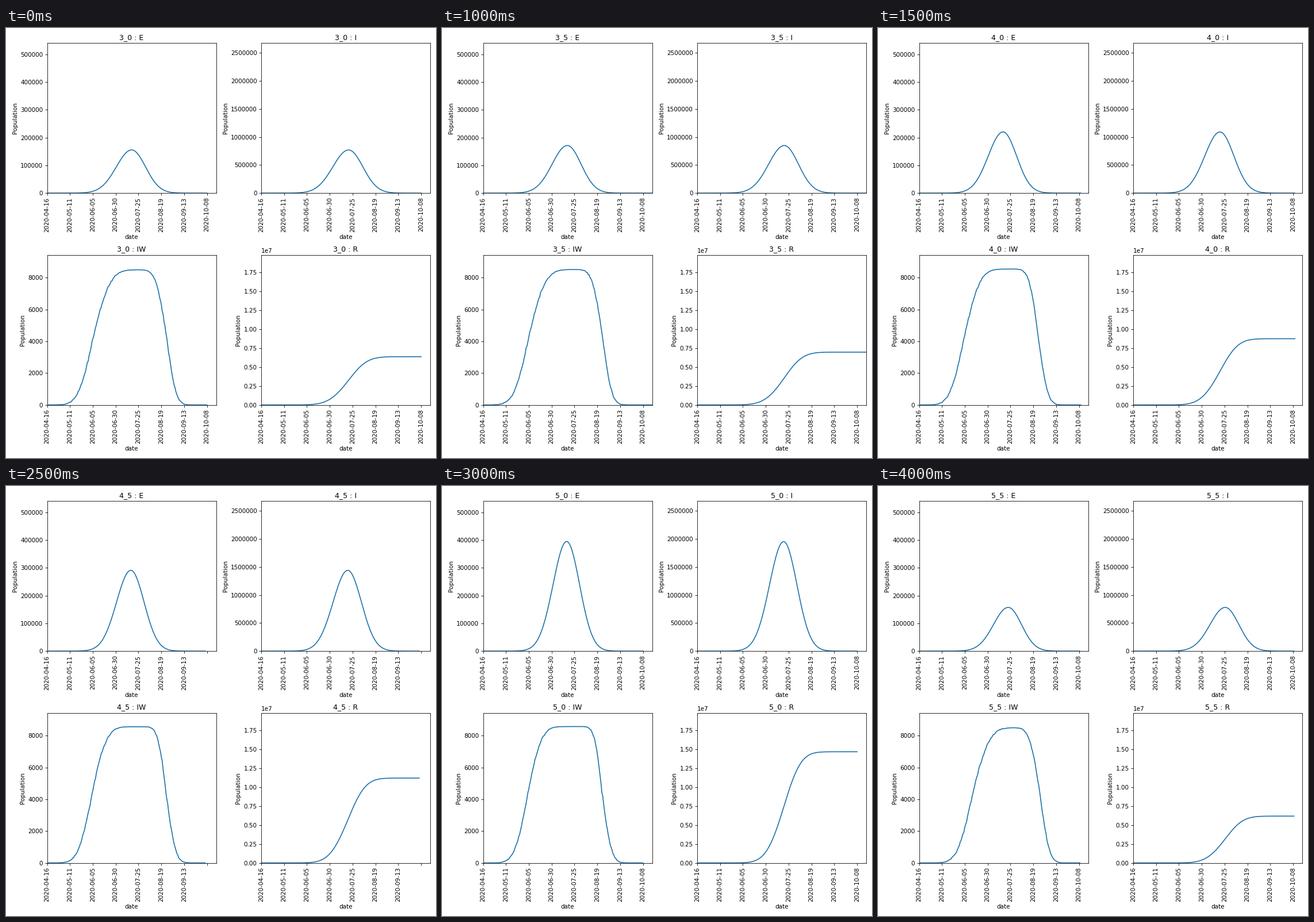
Animation of 748 by 748 pixels, one loop 4.5 s. Source, as a matplotlib script:

```python
import numpy as np
import matplotlib.pyplot as plt
from matplotlib.animation import FuncAnimation

SIZE, DPI = 748, 74.8
plt.rcParams.update({
    "font.family": "DejaVu Sans",
    "axes.formatter.limits": (-7, 7),
})

WARDS = 8590        # places that can hold an infection
BASE = 155e3        # exposed peak of the mildest run
REF_DAY = 92.5      # its usual peak day

# name: last day, exposed peak, day of that peak
RUNS = {
    "3_0": (175, 155.5e3, 92.6),
    "3_5": (190, 171.5e3, 92.2),
    "4_25": (172, 250e3, 91.7),
    "5_0": (175, 395e3, 91.5),
    "5_25": (177, 492e3, 88.9),
    "5_5": (176, 157.5e3, 97.6),
}


def between(a, b, u, last):
    """A run lying between two others."""
    (_, top_a, day_a), (_, top_b, day_b) = RUNS[a], RUNS[b]
    return last, top_a * (top_b / top_a) ** u, day_a + (day_b - day_a) * u


RUNS["3_25"] = between("3_0", "3_5", 1 / 2, 173)
RUNS["4_0"] = between("3_5", "4_25", 2 / 3, 177)
RUNS["4_5"] = between("4_25", "5_0", 1 / 3, 173)
NAMES = sorted(RUNS, key=lambda n: float(n.replace("_", ".")))


def bell(t, mid, before, after):
    width = np.where(t < mid, before, after)
    return np.exp(-((t - mid) / width) ** 2 / 2)


def step(t, mid, before, after):
    """S-curve with its own rate on each side and short tails."""
    z = (t - mid) * np.where(t < mid, before, after)
    return 1 / (1 + np.exp(-z - 0.02 * z ** 3))


def infected_wards(t, top, shift, force, rng):
    rise = step(t, 49.9 + 1.55 * shift + 0.45, .125 + .018 * force, .11 + .027 * force)
    fall = step(t, 130.8 + .33 * shift, .178 + .07 * force, .2)
    p = rise * (1 - fall)
    p /= p.max()
    peak = WARDS - 95 * (BASE / top) ** 2
    noise = rng.normal(0, 50, t.size) * np.sqrt(4 * p * (1 - p))
    return np.clip(peak * p + noise, 0, peak)


def curves(index):
    last, top, day = RUNS[NAMES[index]]
    t = np.arange(last + 1)
    shift, force = day - REF_DAY, np.log(top / BASE)

    # Stronger and later waves are narrower
    before = 16.9 - 2.2 * force - .13 * shift
    after = 15.2 - 1.3 * force - .13 * shift
    e = top * bell(t, day, before, after)
    i = 4.945 * top * bell(t, day + 3.15, 1.03 * before, 1.03 * after)
    r = (np.cumsum(i) - i) / 5
    w = infected_wards(t, top, shift, force, np.random.default_rng(index + 7))
    return t, (e, i, w, r)


fig = plt.figure(figsize=(SIZE / DPI, SIZE / DPI), dpi=DPI, facecolor="white")
TICKS = np.arange(0, 176, 25)
DATES = [str(np.datetime64("2020-04-16") + int(d)) for d in TICKS]

# name and upper limit, row by row
PANELS = [("E", 541e3), ("I", 2.677e6), ("IW", 9440), ("R", 1.981e7)]
axes, lines = [], []
for k, (name, limit) in enumerate(PANELS):
    row, col = divmod(k, 2)
    left, base = 71.5 + 372.4 * col, 287.2 + 368.5 * row
    ax = fig.add_axes([left / SIZE, 1 - base / SIZE, 294 / SIZE, 261.2 / SIZE])
    ax.set(xlim=(0, 185), ylim=(0, limit), xlabel="date", ylabel="Population")
    ax.set_xticks(TICKS, DATES, rotation=90)
    axes.append(ax)
    lines += ax.plot([], [], color="#1b70a9", lw=1.55)


def draw(index):
    t, series = curves(index)
    labels = [d if k <= t[-1] else "" for k, d in zip(TICKS, DATES)]
    for (name, _), ax, line, y in zip(PANELS, axes, lines, series):
        line.set_data(t, y)
        ax.set_title(f"{NAMES[index]} : {name}")
        ax.set_xticklabels(labels)
    return lines


anim = FuncAnimation(fig, draw, frames=len(NAMES), interval=500,
                     repeat=True, repeat_delay=0, blit=False)
plt.show()
```
